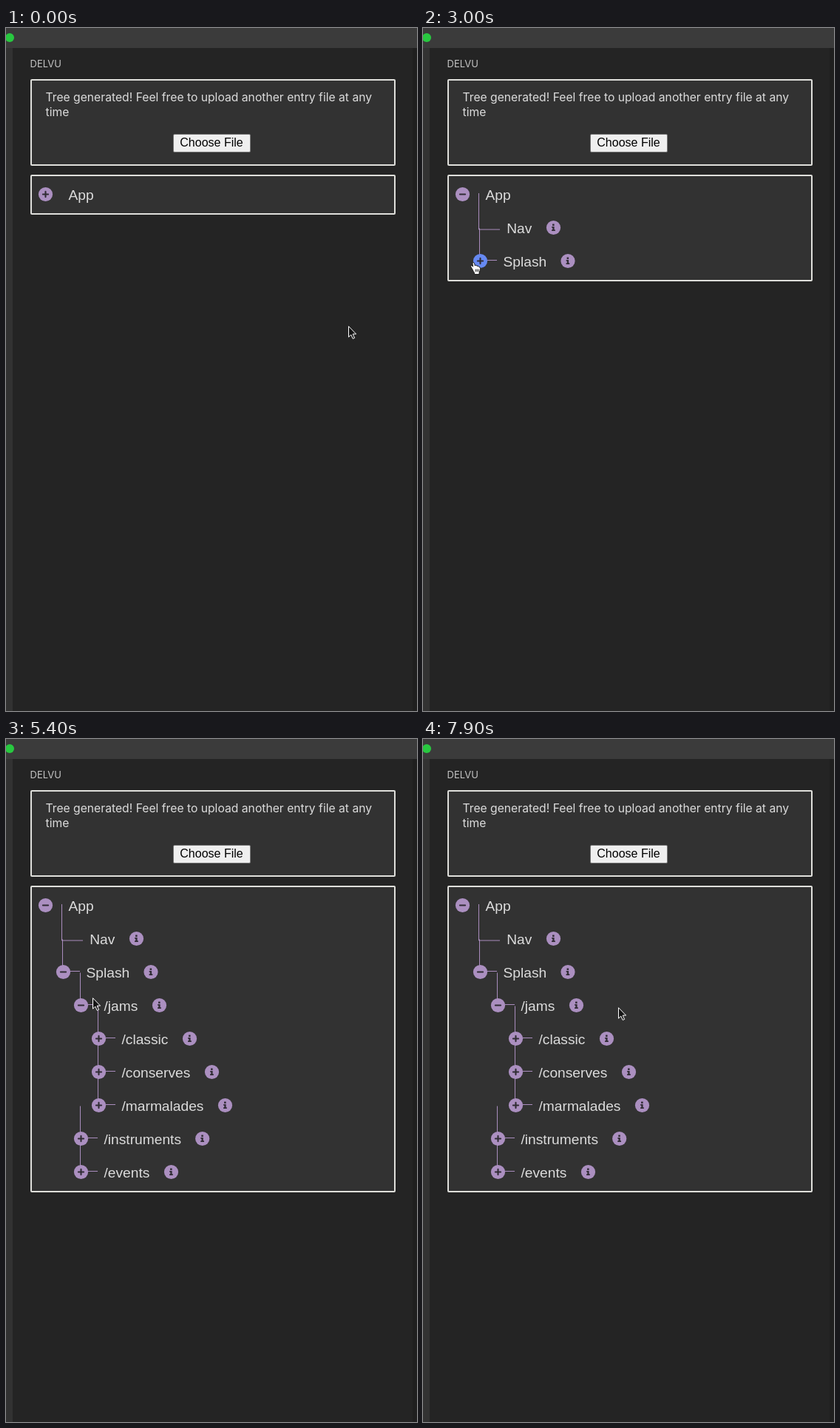
An HTML page that plays this animation: 556x922 px, repeating every 8 s.

```html
<!DOCTYPE html>
<html lang="en">
<head>
<meta charset="utf-8">
<title>Component tree</title>
<style>
  html, body { margin: 0; width: 100%; height: 100%; overflow: hidden; background: #242424; }
  svg { display: block; width: 100vw; height: 100vh; }
  .ui { font-family: Inter, sans-serif; fill: #dcdcdc; }
  .label { font: 19.2px "Liberation Sans", Arial, sans-serif; fill: #dcdcdc; }
  .box { fill: #323232; stroke: #dfdfdb; stroke-width: 2; }
  .line { fill: none; stroke: #a98cbd; stroke-width: 1; }
  .sign { fill: none; stroke: #302c34; stroke-width: 2.1; stroke-linecap: round; }
</style>
</head>
<body>
<svg viewBox="0 0 556 922">
  <rect width="556" height="922" fill="#242424"/>
  <rect y="27" width="9" height="895" fill="#323232"/>
  <rect x="550" y="27" width="6" height="895" fill="#1f1f1f"/>
  <rect width="556" height="27" fill="#3b3b3b"/>
  <circle cx="5" cy="13" r="6" fill="#28c840"/>
  <text class="ui" x="32.5" y="53" font-size="13" style="fill:#c4c4c4">DELVU</text>
  <rect class="box" x="34" y="70" width="492" height="115" rx="1"/>
  <text class="ui" font-size="15.7">
    <tspan x="53.5" y="99">Tree generated! Feel free to upload another entry file at any</tspan>
    <tspan x="53.5" y="119">time</tspan>
  </text>
  <rect x="226.5" y="143.5" width="104" height="24" rx="1.5" fill="#efefef" stroke="#767676"/>
  <text x="235.3" y="160" font-size="16" font-family="Liberation Sans, Arial, sans-serif">Choose File</text>
  <g id="tree"></g>
  <g id="pointer"></g>
</svg>
<script>
const LOOP = 8000, STEP = 100, ROW = 45;
const PURPLE = '#ab8fc0', BLUE = '#6689f2';
const tree = document.getElementById('tree');
const pointer = document.getElementById('pointer');

// Pointer path: time, x, y
const path = [
  [0, 463, 402], [200, 479, 380], [500, 300, 290], [800, 110, 240], [1100, 46, 223],
  [1500, 46, 223], [1700, 49, 232], [2000, 58, 268], [2200, 62, 295], [2600, 64, 316],
  [3500, 64, 316], [4000, 80, 338], [4400, 94, 358], [5200, 94, 358], [5400, 117, 349],
  [5700, 140, 344], [6100, 189, 355], [6300, 194, 357], [7300, 194, 357],
  [7500, 222, 350], [7900, 264, 362], [8000, 264, 362]
];
// Hovered icons: from, to, id
const hovers = [
  [1100, 1700, 'App'], [2400, 3700, 'Splash'], [4200, 5300, '/jams'], [6200, 7500, 'info/jams']
];

const nodes = {
  'App': { depth: 0, opens: 1400, kids: ['Nav', 'Splash'] },
  'Nav': { depth: 1, info: 176.5, leaf: true },
  'Splash': { depth: 1, info: 196, opens: 3200, kids: ['/jams', '/instruments', '/events'] },
  '/jams': { depth: 2, info: 207.5, opens: 4800, kids: ['/classic', '/conserves', '/marmalades'] },
  '/instruments': { depth: 2, info: 265.7 },
  '/events': { depth: 2, info: 223.5 },
  '/classic': { depth: 3, info: 248.5 },
  '/conserves': { depth: 3, info: 278.5 },
  '/marmalades': { depth: 3, info: 296.5 }
};

const line = d => `<path class="line" d="${d}"/>`;
const label = (x, y, s) => `<text class="label" x="${x}" y="${y + 7.5}">${s}</text>`;
const disc = (x, y, hot) => `<circle cx="${x}" cy="${y}" r="9.6" fill="${hot ? BLUE : PURPLE}"/>`;

const toggle = (x, y, open, hot) => disc(x, y, hot) +
  `<path class="sign" d="M${x - 3.6} ${y}h7.2${open ? '' : `M${x} ${y - 3.6}v7.2`}"/>`;

const info = (x, y, hot) => disc(x, y, hot) +
  `<path transform="translate(${x} ${y})" fill="#302c34"
    d="M-1.4-5h2.5v2.4h-2.5zM-2.3-1.5h3.4v4.3h1.2v1.7h-4.7v-1.7h1.2v-2.6h-1.1z"/>`;

const tooltip = `<rect x="130" y="382" width="155" height="60" rx="4" fill="${BLUE}"/>
  <text x="141.8" y="408.5" font-size="15.6" fill="#8d2f9c"
    font-family="Liberation Mono, monospace">data-fetching:</text>
  <text class="ui" x="141.8" y="427" font-size="15">ssg</text>`;

const arrow = `<path d="M.5.7V15.2L3.8 12.1 6.2 17.4 8.6 16.4 6.2 11.1H10.6Z"
  fill="#151515" stroke="#fff" stroke-linejoin="round"/>`;
const hand = `<path fill="#fff" stroke="#111" stroke-width=".9" stroke-linejoin="round"
  d="M3 10L1 6.8Q0 5.2 1.5 4.7Q2.6 4.5 3.6 6.2L3 1.9Q3 .4 4.2.5Q5.2.5 5.6 2L6.3 5Q6.6 3.9 8 4.2
  Q9 4.5 9 5.5Q10 4.8 11 5.4Q11.6 5.8 11.7 6.6Q13.5 6.2 13.5 8.5Q13.5 11.5 12 14V16.5H5.5V14.5Q4 12.5 3 10Z
  M7.2 9.5v3.5M9.1 9.5v3.5M11 9.5v3.5"/>`;

function drawTree(t, hot) {
  let lines = '', items = '', row = 0;
  const visit = id => {
    const n = nodes[id], y = 224.5 + ROW * row++, x = 53.5 + 24 * n.depth;
    const open = t >= n.opens;
    if (n.leaf) {
      lines += line(`M75.5 ${y - 46.5}V${y + 2.5}H104`);
    } else {
      if (n.depth) lines += line(`M${x - 1} ${y - ROW + 1}V${y}M${x + 9} ${y - 1}h13.5`);
      items += toggle(x, y, open, hot === id);
    }
    items += label(n.leaf ? 113.2 : x + 31, y, id);
    if (n.info) items += info(n.info, y, hot === 'info' + id);
    if (open) n.kids.forEach(visit);
  };
  visit('App');
  const height = row === 1 ? 52 : 7 + ROW * row;
  tree.innerHTML = `<rect class="box" x="34" y="199" width="492" height="${height}" rx="1"/>`
    + lines + items + (hot === 'info/jams' ? tooltip : '');
}

function drawPointer(t, hot) {
  const i = path.findIndex(p => p[0] > t);
  const [t0, x0, y0] = path[i - 1], [t1, x1, y1] = path[i];
  const k = (t - t0) / (t1 - t0);
  pointer.setAttribute('transform', `translate(${x0 + (x1 - x0) * k} ${y0 + (y1 - y0) * k})`);
  pointer.innerHTML = hot ? hand : arrow;
}

let last = -1;
function frame(now) {
  const t = Math.floor(now % LOOP / STEP) * STEP;
  if (t !== last) {
    last = t;
    const hover = hovers.find(([from, to]) => t >= from && t < to);
    const hot = hover && hover[2];
    drawTree(t, hot);
    drawPointer(t, hot);
  }
  requestAnimationFrame(frame);
}
frame(0);
</script>
</body>
</html>
```
